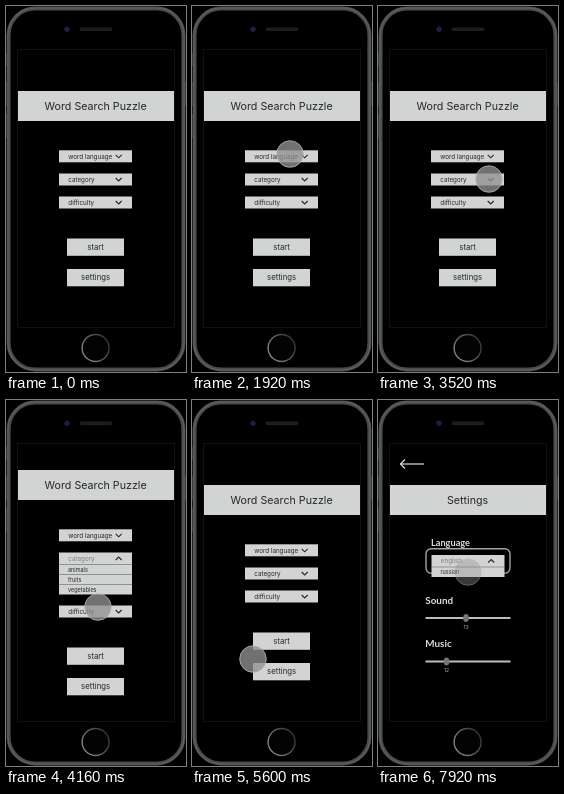
These frames come from a looping animation (180 by 366 pixels, 8 s). An HTML page with a canvas:

```html
<!DOCTYPE html>
<html lang="en">
<head>
<meta charset="utf-8">
<title>Word Search Puzzle</title>
<style>
html, body { margin: 0; width: 100%; height: 100%; overflow: hidden; background: #000; }
canvas { display: block; width: 180px; height: 366px; }
</style>
</head>
<body>
<canvas id="stage"></canvas>
<script>
const canvas = document.getElementById('stage');
const ctx = canvas.getContext('2d');
const ratio = window.devicePixelRatio || 1;
canvas.width = 180 * ratio;
canvas.height = 366 * ratio;

const LOOP = 8000;
const PANEL = '#d2d4d3', INK = '#262626', DIM = '#808080', LIGHT = '#dcdcdc';
const CENTER = 89.6, ROW = 12, ITEM = 10;

const WORD_OPEN = 2240, WORD_CLOSE = 3120;
const CATEGORY_OPEN = 3760, CATEGORY_CLOSE = 4800;
const SETTINGS_AT = 5920, LANGUAGE_OPEN = 7520;
const DRAG_START = 6240, DRAG_END = 6440;

// Pointer stops: it eases to each place, arrives at the given time, then rests
const TRAVEL = 400, FADE = 160;
const STOPS = [
  { at: 1200, x: 150, y: 230 },
  { at: 1840, x: 98, y: 148 },
  { at: 2800, x: 88, y: 162 },
  { at: 3520, x: 111, y: 173 },
  { at: 4160, x: 92, y: 207 },
  { at: 5600, x: 61, y: 259 },
  { at: SETTINGS_AT - FADE, x: 82, y: 272 },
  { at: DRAG_START, x: 70, y: 220 },
  { at: DRAG_END, x: 91, y: 220 },
  { at: LANGUAGE_OPEN - TRAVEL, x: 113, y: 162 },
  { at: 7880, x: 90, y: 172 }
];

const clamp = v => Math.max(0, Math.min(1, v));
const ease = v => v * v * (3 - 2 * v);
const progress = (t, from, to) => ease(clamp((t - from) / (to - from)));
const mix = (a, b, k) => a + (b - a) * k;

function text(str, x, y, size, color = INK, align = 'left', font = 'Inter', weight = 400) {
  ctx.font = `${weight} ${size}px ${font}, sans-serif`;
  ctx.textAlign = align;
  ctx.fillStyle = color;
  ctx.fillText(str, x, y);
}

function rect(x, y, w, h, color = PANEL) {
  ctx.fillStyle = color;
  ctx.fillRect(x, y, w, h);
}

function paint(fill, stroke, width = 1) {
  if (fill) { ctx.fillStyle = fill; ctx.fill(); }
  if (stroke) { ctx.strokeStyle = stroke; ctx.lineWidth = width; ctx.stroke(); }
}

function rounded(x, y, w, h, r, fill, stroke, width) {
  ctx.beginPath();
  ctx.roundRect(x, y, w, h, r);
  paint(fill, stroke, width);
}

function ellipse(x, y, rx, ry, fill, stroke, width) {
  ctx.beginPath();
  ctx.ellipse(x, y, rx, ry, 0, 0, 2 * Math.PI);
  paint(fill, stroke, width);
}

function line(color, width, ...points) {
  ctx.beginPath();
  points.forEach(([x, y]) => ctx.lineTo(x, y));
  paint(null, color, width);
}

// Outline inset evenly from the stage edge
function shell(inset, fill, stroke, width) {
  rounded(inset, inset, 180 - 2 * inset, 366 - 2 * inset, 29 - inset, fill, stroke, width);
}

function phone() {
  rect(0, 0, 180, 366, '#000');
  rect(0, 47, 1, 13, '#333');
  for (const x of [0, 179]) rect(x, 76, 1, 24, '#333');
  rect(0, 108, 1, 24, '#333');
  shell(2.6, '#000', '#484a4b', 4);
  shell(2, null, '#5c5e60', 1.4);
  rounded(11.5, 43.5, 157, 278, 0, null, '#111');
  rounded(74, 22, 32, 2.5, 1.2, '#1b1b1b', '#262626', 0.8);
  ellipse(61, 23.3, 2.3, 2.3, '#17203d', '#232a40', 0.8);
  const ring = ctx.createLinearGradient(77, 350, 103, 334);
  ring.addColorStop(0, '#888');
  ring.addColorStop(1, '#303030');
  ellipse(CENTER, 342, 13.5, 13.5, '#030303', ring, 1.4);
}

function banner(title, y) {
  rect(12, y, 156, 30);
  text(title, CENTER, y + 18.7, 10.7, INK, 'center');
}

function dropdown(label, y, items = [], x = 53) {
  const open = items.length > 0;
  const tip = open ? -1.5 : 1.5;
  const middle = y + ROW / 2;
  rect(x, y, 73, ROW + items.length * ITEM);
  text(label, x + 9.3, y + 8.2, 6.25, open ? DIM : INK);
  line(INK, 1.1, [x + 56.7, middle - tip], [x + 59.7, middle + tip], [x + 62.7, middle - tip]);
  items.forEach((item, i) => {
    const top = y + ROW + i * ITEM;
    line('#666', 0.6, [x, top], [x + 73, top]);
    text(item, x + 9, top + 7, 5.5);
  });
}

function button(label, y) {
  rect(61, y, 57, 17.3);
  text(label, CENTER, y + 11.2, 7.75, INK, 'center');
}

// An open list pushes what is above it up and what is below it down
function home(t) {
  const words = t >= WORD_OPEN && t < WORD_CLOSE ? ['english', 'russian'] : [];
  const kinds = t >= CATEGORY_OPEN && t < CATEGORY_CLOSE ? ['animals', 'fruits', 'vegetables'] : [];
  const push = (words.length + kinds.length) * ITEM / 2;
  banner('Word Search Puzzle', 85 - push);
  dropdown('word language', 144.3 - push, words);
  dropdown('category', 167.5 - push + words.length * ITEM, kinds);
  dropdown('difficulty', 190.5 + push);
  button('start', 232.5 + push);
  button('settings', 263 + push);
}

function heading(label, x, y, size) {
  text(label, x, y, size, LIGHT, 'left', 'Lato', 700);
}

function slider(label, y, knob, value) {
  heading(label, 47.3, y - 14.5, 9.9);
  line('#bdbdbd', 1.8, [47.5, y], [132.5, y]);
  ellipse(knob, y, 2.8, 4, '#6f777b');
  text(value, knob, y + 10.5, 5, '#a9bdc8', 'center');
}

function settings(t) {
  line(LIGHT, 1.2, [46, 64], [22.5, 64]);
  line(LIGHT, 1.2, [27, 59.5], [22.5, 64], [27, 68.5]);
  banner('Settings', 85);
  heading('Language', 53, 145.5, 9.2);
  rounded(48, 148.7, 84, 24.4, 5, null, '#a4a4a4', 1.4);
  dropdown('english', 155, t >= LANGUAGE_OPEN ? ['russian'] : [], 53.5);
  const drag = progress(t, DRAG_START, DRAG_END);
  slider('Sound', 218, mix(68.5, 88, drag), drag > 0.5 ? '13' : '12');
  slider('Music', 261.5, 68.5, '12');
}

function pointer(t) {
  const next = STOPS.findIndex(stop => stop.at > t);
  if (next === 0) return;
  const from = STOPS.at(next < 0 ? -1 : next - 1);
  const to = STOPS.at(next);
  const k = progress(t, Math.max(from.at, to.at - TRAVEL), to.at + 0.01);
  const place = next < 0 ? to : { x: mix(from.x, to.x, k), y: mix(from.y, to.y, k) };
  ctx.globalAlpha = clamp(Math.min(t - STOPS[0].at, LOOP - t) / FADE);
  ellipse(place.x, place.y, 13.3, 13.3, 'rgba(145,145,145,.78)', 'rgba(185,185,185,.75)');
  ctx.globalAlpha = 1;
}

function draw() {
  const t = performance.now() % LOOP;
  ctx.setTransform(ratio, 0, 0, ratio, 0, 0);
  phone();
  (t < SETTINGS_AT ? home : settings)(t);
  pointer(t);
  requestAnimationFrame(draw);
}
draw();
</script>
</body>
</html>
```
